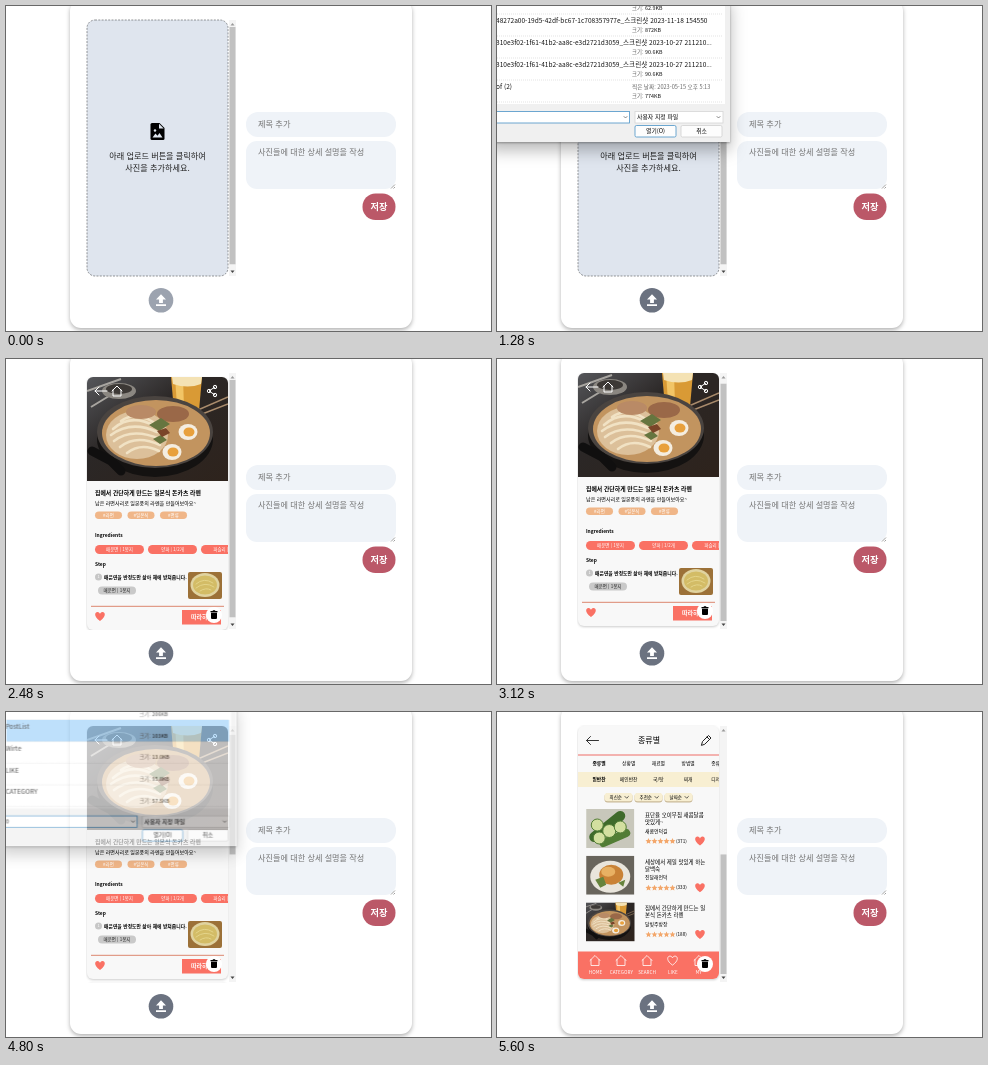
Animation, 485 px wide and 325 px high, one loop 6 s. Source, as an HTML page:

```html
<!DOCTYPE html>
<html lang="ko">
<head>
<meta charset="utf-8">
<title>사진 업로드</title>
<style>
  html, body { margin: 0; width: 100%; height: 100%; overflow: hidden; background: #fff; }
  svg { display: block; font-family: "Noto Sans CJK KR", "Noto Sans CJK", "Noto Sans", sans-serif; }
  #card { filter: drop-shadow(0 2px 2px rgba(0, 0, 0, .3)); }
  .page { filter: drop-shadow(0 1px 1px rgba(0, 0, 0, .2)); }
  .dialog {
    filter: drop-shadow(0 1px 1px rgba(0, 0, 0, .3)) drop-shadow(0 8px 8px rgba(0, 0, 0, .28));
    transform-origin: 30px 0; opacity: 0;
  }
  .line { fill: none; stroke-linecap: round; stroke-linejoin: round; }
</style>
</head>
<body>
<svg id="stage" width="485" height="325" viewBox="0 0 485 325">
  <defs>
    <clipPath id="view"><rect x="80" y="13" width="143" height="258"/></clipPath>
    <clipPath id="sheet"><rect x="81" y="14" width="141" height="253" rx="6"/></clipPath>
    <linearGradient id="table" x2="1" y2="1">
      <stop stop-color="#55565a"/><stop offset=".4" stop-color="#2b2726"/><stop offset="1" stop-color="#2e231c"/>
    </linearGradient>
    <path id="heart" d="M0 4.6C-7-.2-5-4.6-2.4-4.4-1-4.3-.3-3.3 0-2.6.3-3.3 1-4.3 2.4-4.4 5-4.6 7-.2 0 4.6Z"/>
    <path id="star" d="M0-3 .9-1 3-.8 1.4.7 1.9 2.8 0 1.7-1.9 2.8-1.4.7-3-.8-.9-1Z"/>
    <path id="home" class="line" d="M-5 0 0-5 5 0M-4-1V5H4V-1"/>
    <path id="back" class="line" d="M6 0H-6M-2-4-6 0-2 4"/>
    <g id="egg">
      <ellipse rx="9.500" ry="8" fill="#f4ede0"/><ellipse cx="1" rx="5.500" ry="4.600" fill="#e8a03c"/>
    </g>
    <g id="trash">
      <circle r="8" fill="#fff"/>
      <path d="M-3.5-4h2l.6-.8h1.8l.6.8h2v1.2h-7zM-3-2.2h6V3q0 1-1 1h-4q-1 0-1-1z"/>
    </g>
    <symbol id="ramen" viewBox="0 0 141 104" preserveAspectRatio="xMidYMid slice">
      <rect width="141" height="104" fill="url(#table)"/>
      <path d="M0 14 34 2M4 30 40 8" stroke="#a8a5a0" stroke-width="2"/>
      <ellipse cx="32" cy="14" rx="17" ry="8" fill="#8b8781"/><ellipse cx="32" cy="12" rx="13" ry="5" fill="#3c3835"/>
      <path d="M84 0h31l-3 34q-13 6-25 0z" fill="#d99a35"/><path d="M88 0h8l1 31q-4 0-7-2z" fill="#f2c566"/>
      <path d="M85 0h30l-1 7q-13 5-28 0z" fill="#f4e2b4"/>
      <path d="M104 36 141 20M110 39 141 27" stroke="#a98b6c" stroke-width="1.500"/>
      <ellipse cx="68" cy="62" rx="58" ry="38" fill="#141211"/>
      <ellipse cx="68" cy="55" rx="58" ry="36" fill="#4a4440"/>
      <ellipse cx="69" cy="56" rx="54" ry="33" fill="#c2945f"/>
      <ellipse cx="50" cy="58" rx="31" ry="24" fill="#dcc09a"/>
      <path class="line" d="M26 52q18-16 42-3M24 58q20-15 46-3M27 64q18-14 46-2M33 70q16-13 40-2M40 76q14-11 32-2M34 44q14-10 32 1" stroke="#f1e2c4" stroke-width="2.600"/>
      <ellipse cx="86" cy="37" rx="16" ry="8" fill="#9a6848"/><ellipse cx="54" cy="35" rx="15" ry="7" fill="#b98a66"/>
      <path d="M62 48l12-7 9 6-11 7zM66 62l8-4 6 5-7 4z" fill="#66753f"/>
      <path d="M70 54l9-3 4 5-8 4z" fill="#7b4529"/>
      <use href="#egg" x="101" y="55"/><use href="#egg" x="85" y="75"/>
      <path class="line" d="M5 74 24 84 34 94" stroke="#100f0f" stroke-width="9"/>
    </symbol>
    <symbol id="cucumber" viewBox="0 0 48 39">
      <rect width="48" height="39" fill="#c8c7bb"/>
      <path class="line" d="M8 28 34 7" stroke="#3f6a2b" stroke-width="10"/>
      <path class="line" d="M17 34 40 24" stroke="#527d35" stroke-width="8"/>
      <g fill="#d3dfa0" stroke="#527d35"><circle cx="11" cy="16" r="6"/><circle cx="23" cy="22" r="6.5"/><circle cx="34" cy="18" r="6"/><circle cx="13" cy="29" r="6"/></g>
    </symbol>
    <symbol id="chicken" viewBox="0 0 48 39">
      <rect width="48" height="39" fill="#68645c"/>
      <ellipse cx="24" cy="21" rx="20" ry="16" fill="#e9e5dc"/>
      <ellipse cx="25" cy="19" rx="12" ry="10" fill="#c98236"/><ellipse cx="22" cy="16" rx="7" ry="5" fill="#e8b163"/>
      <path d="M9 24l8-3 3 8-6 3zM32 27l7-3-2 7z" fill="#66833c"/>
    </symbol>
  </defs>

  <rect id="card" x="64" y="-6" width="342" height="328" rx="11" fill="#fff"/>
  <g id="form"></g>
  <g clip-path="url(#view)">
    <g id="empty"></g>
    <g id="scroller"><g id="first" class="page" opacity="0"></g><g id="second" class="page" opacity="0"></g></g>
  </g>
  <rect x="223" y="14" width="7" height="256" fill="#f4f4f4"/>
  <path d="M224.500 19.500 226.500 17 228.500 19.500Z" fill="#999"/><path d="M224.500 264.500h4l-2 2.500z" fill="#444"/>
  <rect id="thumb" x="223.500" width="6" fill="#c1c1c1"/>
  <circle id="upload" cx="155" cy="294.300" r="12.300" fill="#9ca3af"/>
  <path d="M155 288.200l5 5.300h-3.100v3.600h-3.800v-3.600H150zM150 298.300h10v1.700h-10z" fill="#fff"/>
  <g id="dialogA" class="dialog"></g>
  <g id="dialogB" class="dialog"></g>
</svg>

<script>
const LOOP = 6000, STEP = 80;
const $ = id => document.getElementById(id);
const SALMON = '#fa7164';

// cy is the optical middle of the line
const text = (x, cy, size, str, attrs = '') =>
  `<text x="${x}" y="${cy + size * .36}" font-size="${size}" ${attrs}>${str}</text>`;
const middle = 'text-anchor="middle"';
const rect = (x, y, w, h, fill, attrs = '') =>
  `<rect x="${x}" y="${y}" width="${w}" height="${h}" fill="${fill}" ${attrs}/>`;
const use = (id, x, y, attrs = '') => `<use href="#${id}" transform="translate(${x} ${y})" ${attrs}/>`;
const photo = (id, x, y, w, h) => `<use href="#${id}" x="${x}" y="${y}" width="${w}" height="${h}"/>`;
const pill = (x, y, w, h, fill, label, size, color = '#fff') =>
  rect(x, y, w, h, fill, `rx="${h / 2}"`) + text(x + w / 2, y + h / 2, size, label, `${middle} fill="${color}"`);

$('form').innerHTML =
  rect(240, 106, 150, 25, '#eff3f8', 'rx="12"') + rect(240, 135, 150, 48, '#eff3f8', 'rx="11"') +
  text(252, 118.500, 8.200, '제목 추가', 'fill="#757575"') +
  text(252, 146.500, 8.150, '사진들에 대한 상세 설명을 작성', 'fill="#757575"') +
  '<path d="M385 182.500l4-4M387.500 182.500l1.500-1.500" stroke="#777" stroke-width=".7"/>' +
  rect(356.500, 187.500, 33, 26.500, '#bb5868', 'rx="13"') +
  text(373, 200.500, 9.200, '저장', `${middle} fill="#fff" font-weight="700"`);

$('empty').innerHTML =
  rect(81, 14, 141, 256, '#dfe5ee', 'rx="8" stroke="#77797d" stroke-width=".8" stroke-dasharray="2 1.300"') +
  '<path d="M146 117h7.500l5 5v10.500q0 1.500-1.500 1.500h-11q-1.500 0-1.500-1.500v-14q0-1.500 1.500-1.500z"/>' +
  '<path d="M153 117.800v4.700h4.700zM146.500 131.500l3-4 2 2.300 2-2.800 3 4.500z" fill="#dfe5ee"/><circle cx="149" cy="124.500" r="1.200" fill="#dfe5ee"/>' +
  text(151.500, 150, 8.150, '아래 업로드 버튼을 클릭하여', `${middle} fill="#222"`) +
  text(151.500, 162.300, 8.150, '사진을 추가하세요.', `${middle} fill="#222"`);

const sheet = body => `<g clip-path="url(#sheet)">${rect(81, 14, 141, 253, '#f8f8f8')}${body}</g>${use('trash', 208, 252)}`;
const bold = 'font-weight="700"';

$('first').setAttribute('transform', 'translate(0 4)');
$('first').innerHTML = sheet(
  photo('ramen', 81, 14, 141, 104) +
  use('back', 95, 28, 'stroke="#fff"') + use('home', 111, 28, 'stroke="#fff"') +
  '<path d="M209 24 203 28 209 32" class="line" stroke="#fff"/><g fill="none" stroke="#fff"><circle cx="209" cy="24" r="1.700"/><circle cx="203" cy="28" r="1.700"/><circle cx="209" cy="32" r="1.700"/></g>' +
  text(89, 130, 5.900, '집에서 간단하게 만드는 일본식 돈카츠 라멘', bold) +
  text(89, 140, 5.050, '남은 라면사리로 일본풍의 라멘을 만들어보아요~') +
  ['#라면', '#일본식', '#면류'].map((tag, i) => pill(89 + i * 32.500, 148.500, 27, 7.500, '#f0b688', tag, 4.500)).join('') +
  text(89, 172, 4.900, 'Ingredients', bold) +
  ['매운면 | 1봉지', '양파 | 1/2개', '파슬리 | 약간'].map((item, i) => pill(89 + i * 53, 182, 49, 9, SALMON, item, 4.500)).join('') +
  text(89, 201.500, 4.900, 'Step', bold) +
  '<circle cx="92.500" cy="214" r="3.500" fill="#c6c6c6"/>' + text(92.500, 214, 4, '1', `${middle} fill="#fff"`) +
  text(98, 214, 4.850, '매운면을 반정도만 삶아 체에 받쳐줍니다.', bold) +
  pill(92, 223.500, 38, 8, '#c9c9c9', '매운면 | 1봉지', 4.500, '#222') +
  rect(182, 209, 34, 27, '#9c7138', 'rx="2"') +
  '<ellipse cx="199" cy="222" rx="14.500" ry="12" fill="#e0d3a0"/><ellipse cx="199" cy="222" rx="12" ry="9.500" fill="#d3bc66"/>' +
  '<path class="line" d="M190 221q8-7 17-1M190 225q9-7 18-1M194 228q6-4 11-1" stroke="#e4d489"/>' +
  rect(85, 242.800, 133, 1, '#dd876f') +
  use('heart', 94, 253.500, `fill="${SALMON}"`) +
  rect(176, 247, 39, 14.500, SALMON) + text(196, 254, 6, '따라하기', `${middle} fill="#fff" font-weight="700"`));

const recipes = [
  ['cucumber', '표단율 오이무침 새콤달콤', '맛있게~', '새콤언덕길', 371],
  ['chicken', '세상에서 제일 맛있게 하는', '닭백숙', '진달래언덕', 333],
  ['ramen', '집에서 간단하게 만드는 일', '본식 돈카츠 라멘', '달빛주방장', 180],
];
const recipeRow = ([pic, line1, line2, cook, votes], i) => {
  const y = 97 + i * 46.700;
  const stars = [0, 1, 2, 3, 4].map(k => use('star', 151.500 + k * 6, y + 32, 'fill="#f3a76b"')).join('');
  return photo(pic, 89, y, 48.500, 39) +
    text(148, y + 6, 5.500, line1, 'font-weight="500"') + text(148, y + 13, 5.500, line2, 'font-weight="500"') +
    text(148, y + 22, 4.900, cook) + stars + text(179, y + 32, 4.600, `(${votes})`) +
    use('heart', 203, y + 32, `fill="${SALMON}"`);
};
const tabs = (y, labels) => labels.map((s, i) =>
  text(102 + i * 29.700, y, 4.800, s, `${middle} font-weight="${i ? 400 : 700}"`)).join('');
const nav = ['HOME', 'CATEGORY', 'SEARCH', 'LIKE', 'MY'];
const navIcon = i => i === 3
  ? use('heart', 175.500, 248.500, 'fill="none" stroke="#fff" stroke-width=".8"')
  : use('home', 98 + i * 26, 248.500, 'stroke="#fff" stroke-width=".8"');

$('second').setAttribute('transform', 'translate(0 260)');
$('second').innerHTML = sheet(
  use('back', 95.500, 28.500, 'stroke="#333"') +
  text(152, 28.500, 8, '종류별', `${middle} font-weight="500"`) +
  '<path class="line" d="M204.500 33l1-3.500 6-6 2.500 2.500-6 6zM210 25l2.500 2.500" stroke="#222"/>' +
  rect(81, 42.500, 141, 1, '#ef6f69') +
  tabs(51.500, ['종류별', '상황별', '재료별', '방법별', '종류별']) +
  rect(81, 60, 141, 15, '#f8efd2') +
  tabs(67.500, ['밑반찬', '메인반찬', '국/탕', '찌개', '디저트']) +
  ['최신순', '추천순', '날짜순'].map((s, i) => {
    const x = 107.500 + i * 30;
    return rect(x, 81.500, 28, 9, '#c9b998', 'rx="3"') + rect(x, 81, 28, 8.300, '#f8efd2', 'rx="3"') +
      text(x + 5, 85, 4.500, s) + `<path class="line" d="M${x + 20.500} 84.500l1.700 1.700 1.700-1.700" stroke="#333" stroke-width=".8"/>`;
  }).join('') +
  recipes.map(recipeRow).join('') +
  rect(81, 239.500, 141, 28, SALMON) +
  nav.map((s, i) => navIcon(i) + text(98.500 + i * 25.800, 260, 4.700, s, `${middle} fill="#fff"`)).join(''));

// rows: [file name, size, date]; picked is the row under the pointer
const dialog = (rows, topSize, picked, typed) => {
  const list = rows.map(([name, size, date], i) => {
    const y = 15 + i * 22;
    return (i === picked ? rect(0, y - 7, 226, 22, '#e5f3ff', 'class="pick"') : '') +
      text(-1, y, 6.550, name, 'fill="#111"') + (date ? text(135, y, 5.600, date, 'fill="#666"') : '') +
      text(135, y + 9, 5.400, `크기: <tspan fill="#111">${size}</tspan>`, 'fill="#666"') +
      `<path d="M0 ${y + 15}H226" stroke="#d0d0d0" stroke-width=".6" stroke-dasharray="1 1"/>`;
  }).join('');
  const button = (x, label, edge) => rect(x, 119.500, 41, 11.500, '#fdfdfd', `rx="1.500" stroke="${edge}" stroke-width=".8"`) +
    text(x + 20.500, 125, 5.800, label, middle);
  const chevron = x => `<path class="line" d="M${x} 110.500l1.500 1.500 1.500-1.500" stroke="#555" stroke-width=".7"/>`;
  return rect(-10, -10, 243, 146, '#f0f0f0') + rect(-10, -10, 238, 108, '#fff') +
    text(135, 2, 5.400, `크기: <tspan fill="#111">${topSize}</tspan>`, 'fill="#666"') +
    '<path d="M0 8H226" stroke="#d0d0d0" stroke-width=".6" stroke-dasharray="1 1"/>' + list +
    rect(-5, 105.500, 137.500, 11.500, '#fff', 'stroke="#4a92c6" stroke-width=".8"') + chevron(127) +
    `<g class="typed" opacity="0">${text(-1, 111, 6, typed)}</g>` +
    rect(138, 105.500, 88, 11.500, '#fff', 'stroke="#d5d5d5" stroke-width=".8"') + chevron(220) +
    text(140, 111, 5.900, '사용자 지정 파일') + button(138, '열기(O)', '#4a92c6') + button(184, '취소', '#d0d0d0');
};
const shot = '310e3f02-1f61-41b2-aa8c-e3d2721d3059_스크린샷 2023-10-27 211210...';
$('dialogA').innerHTML = dialog([
  ['48272a00-19d5-42df-bc67-1c708357977e_스크린샷 2023-11-18 154550', '872KB'],
  [shot, '90.6KB'], [shot, '90.6KB'],
  ['of (2)', '774KB', '찍은 날짜: 2023-05-15 오후 5:13'],
], '62.9KB', 1, 'png');
$('dialogB').innerHTML = dialog([
  ['PostList', '103KB'], ['Wirte', '13.0KB'], ['LIKE', '95.8KB'], ['CATEGORY', '57.5KB'],
], '206KB', 0, 'o');

// Each stop [time, properties] holds until the next one.
function play(el, stops) {
  const frames = stops.map(([t, props]) => ({ offset: t / LOOP, easing: 'steps(1, end)', ...props }));
  frames.push({ ...frames.at(-1), offset: 1 });
  el.animate(frames, { duration: LOOP, iterations: Infinity });
}
const ramp = (from, to, at) => {
  const count = (to - from) / STEP;
  return Array.from({ length: count + 1 }, (_, i) => [from + i * STEP, at((i + 1) / (count + 1))]);
};
const show = (from, to) => [[0, { opacity: 0 }], [from, { opacity: 1 }], ...(to ? [[to, { opacity: 0 }]] : [])];

const mix = (a, b, u) => a.map((v, i) => Math.round(v + (b[i] - v) * u));
play($('upload'), [[0, { fill: '#9ca3af' }],
  ...ramp(80, 320, u => ({ fill: `rgb(${mix([156, 163, 175], [107, 114, 128], u)})` }))]);

const fade = (opacity, scale) => ({ opacity, transform: `scale(${scale})` });
function playDialog(el, open, hover, select, close) {
  play(el, [[0, fade(0, .97)], [open, fade(.3, .98)], [open + 80, fade(.8, .995)], [open + 160, fade(1, 1)],
    [close, fade(.7, .985)], [close + 80, fade(.15, .975)], [close + 160, fade(0, .97)]]);
  play(el.querySelector('.pick'), [[0, { opacity: 0, fill: '#e5f3ff' }],
    [hover, { opacity: 1, fill: '#e5f3ff' }], [select, { opacity: 1, fill: '#a3d3fa' }]]);
  play(el.querySelector('.typed'), show(select));
}
playDialog($('dialogA'), 1040, 1680, 1840, 2240);
playDialog($('dialogB'), 3520, 3760, 4400, 4800);

play($('empty'), [[0, { opacity: 1 }], [2240, { opacity: 0 }]]);
play($('first'), show(2240));
play($('second'), show(4800));

const smooth = u => u * u * (3 - 2 * u);
const scroll = [[0, 0], ...ramp(2960, 3120, u => 4 * u), [4800, 4], ...ramp(5040, 5600, u => 4 + 256 * smooth(u))];
play($('scroller'), scroll.map(([t, y]) => [t, { transform: `translateY(${-y}px)` }]));
play($('thumb'), scroll.map(([t, y]) => {
  const content = t < 4800 ? 260 : 516;
  return [t, { y: `${21 + 241 * y / content}px`, height: `${241 * 256 / content}px` }];
}));
</script>
</body>
</html>
```
